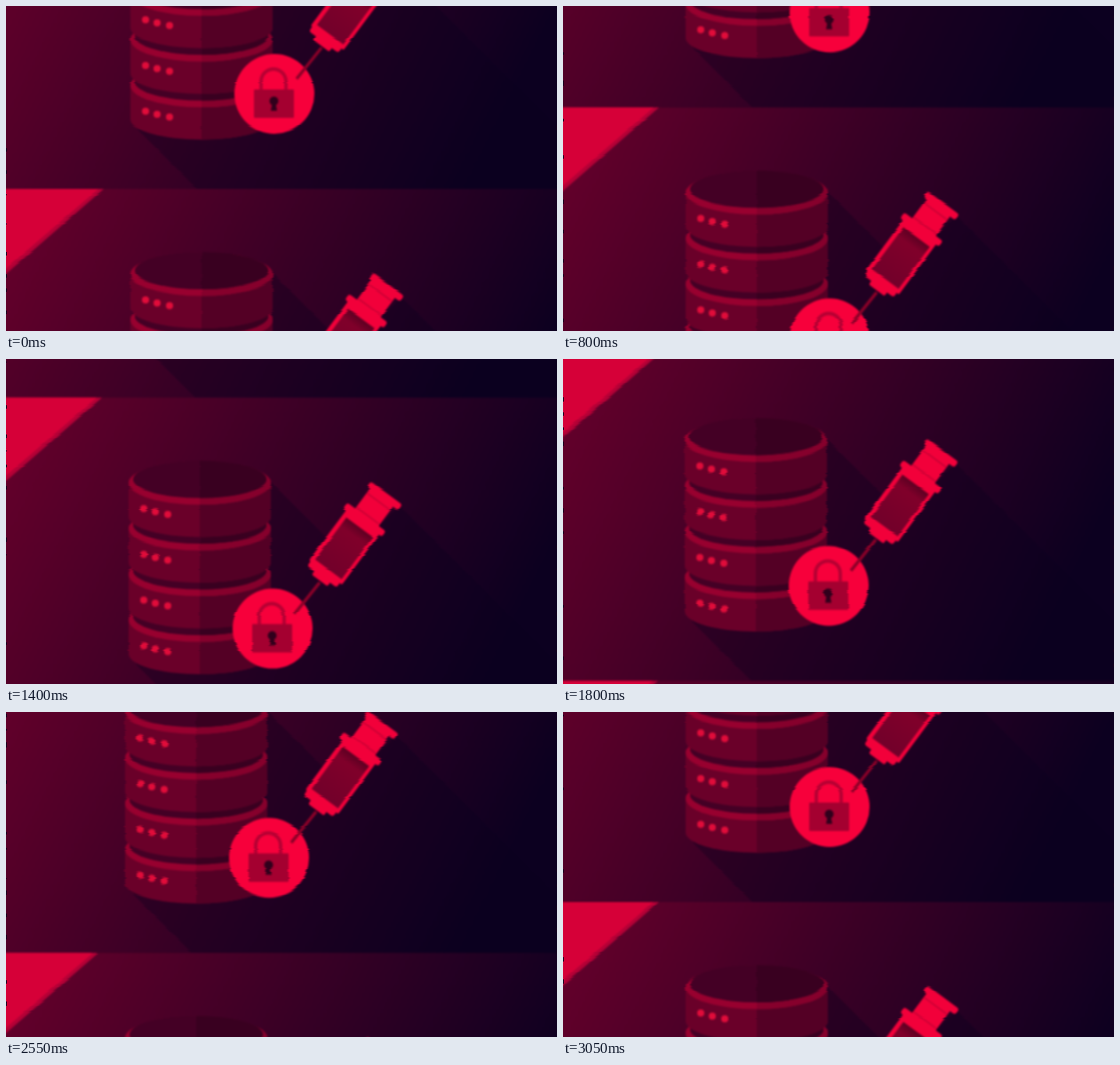
An HTML page that plays this animation: 620 by 366 pixels, repeating every 3.1 s.

```html
<!DOCTYPE html>
<html lang="en">
<head>
<meta charset="utf-8">
<title>Database injection</title>
<style>
  html, body { margin: 0; width: 100%; height: 100%; overflow: hidden; background: #14001c; }
  svg { display: block; }
</style>
</head>
<body>
<svg width="620" height="366" viewBox="0 0 620 366">
  <defs>
    <linearGradient id="night" gradientUnits="userSpaceOnUse" x1="0" y1="0" x2="560" y2="280">
      <stop offset="0" stop-color="#68002b"/>
      <stop offset="1" stop-color="#0c0020"/>
    </linearGradient>
    <linearGradient id="serum" x1="0" y1="0" x2="0" y2="1">
      <stop offset="0" stop-color="#5c0022"/>
      <stop offset=".2" stop-color="#80002a"/>
      <stop offset="1" stop-color="#72002a"/>
    </linearGradient>
    <filter id="tearing" filterUnits="userSpaceOnUse" x="0" y="0" width="620" height="366"
            color-interpolation-filters="sRGB">
      <feTurbulence id="noise" type="fractalNoise" baseFrequency="0.0001 0.12" numOctaves="1"/>
      <feColorMatrix values="1 0 0 0 0  0 0 0 0 .5  0 0 0 0 .5  0 0 0 0 1" result="rows"/>
      <feGaussianBlur in="SourceGraphic" stdDeviation=".8" result="soft"/>
      <feDisplacementMap in="soft" in2="rows" scale="4" xChannelSelector="R" yChannelSelector="G"/>
    </filter>

    <g id="disk">
      <path d="M138 92V134A80 23 0 0 0 298 134V92Z" fill="#6a0029"/>
      <path d="M218 92V157A80 23 0 0 0 298 134V92Z" fill="#540025"/>
      <ellipse cx="218" cy="96" rx="80" ry="24.5" fill="#98002f"/>
      <path d="M218 71.5A80 24.5 0 0 1 218 120.5Z" fill="#86002c"/>
      <ellipse cx="218" cy="92" rx="75" ry="21" fill="#440025"/>
      <path d="M218 71A75 21 0 0 1 218 113Z" fill="#390020"/>
      <g fill="#e00c3a">
        <circle cx="155" cy="125" r="4"/>
        <circle cx="168" cy="128.5" r="4"/>
        <circle cx="182" cy="131.5" r="4"/>
      </g>
    </g>

    <g id="syringe" transform="translate(427 109) rotate(36.5)" fill="#f2003a">
      <rect x="-22" y="-2" width="44" height="8" rx="3"/>
      <rect x="-18" y="4" width="33" height="34"/>
      <path d="M-17 11H14M-17 31H14" stroke="#c40034" stroke-width="1.5"/>
      <rect x="-29" y="33" width="54" height="8" rx="3"/>
      <rect x="-25" y="38" width="46" height="73" rx="2"/>
      <rect x="-23" y="109" width="41" height="8" rx="3"/>
      <rect x="-13" y="115" width="22" height="7" rx="2"/>
      <rect x="-20" y="47" width="37" height="59" fill="url(#serum)"/>
    </g>

    <g id="lock">
      <circle cx="300" cy="260" r="45" fill="#f7003b"/>
      <path d="M285 256V246A14 14 0 0 1 313 246V256" fill="none" stroke="#b60033" stroke-width="4"/>
      <rect x="277" y="255" width="45" height="32" rx="1" fill="#a40030"/>
      <circle cx="299.5" cy="268" r="5" fill="#30001c"/>
      <path d="M298 268H301L303 279H296Z" fill="#30001c"/>
    </g>

    <g id="panel">
      <rect x="-12" width="644" height="367.5" fill="url(#night)"/>
      <path d="M297 94L570 367H213L146 300ZM443 122L632 311V367H560L352 210Z" fill="#0a001e" fill-opacity=".34"/>
      <path d="M-12 0H108L0 94L-12 104Z" fill="#b40036"/>
      <path d="M-12 0H102L0 88L-12 98Z" fill="#d60038"/>
      <use href="#disk" y="154.5"/>
      <use href="#disk" y="103"/>
      <use href="#disk" y="51.5"/>
      <use href="#disk"/>
      <use href="#lock"/>
      <path d="M353 208L325 243" stroke="#8a0028" stroke-width="3.5"/>
      <use href="#syringe"/>
    </g>
  </defs>
  <g filter="url(#tearing)">
    <use class="reel" href="#panel"/>
    <use class="reel" href="#panel"/>
  </g>
</svg>
<script>
  const LOOP = 3100, STEP = 50, PERIOD = 367, START = 207;
  // Camera shake: [time, x, y]
  const shake = [
    [0, 2, -1], [350, -3, -.7], [800, 0, 2], [1400, 0, 2.3],
    [1800, -1, 1.5], [2550, -4, -.9], [3050, 0, 1.1], [3100, 2, -1]
  ];
  const panels = document.querySelectorAll('.reel');
  const noise = document.getElementById('noise');

  function shakeAt(t) {
    const i = shake.findIndex(key => key[0] > t);
    const [t0, x0, y0] = shake[i - 1], [t1, x1, y1] = shake[i];
    const k = (t - t0) / (t1 - t0);
    return [x0 + (x1 - x0) * k, y0 + (y1 - y0) * k];
  }

  function draw(time) {
    const t = Math.floor(time % LOOP / STEP) * STEP;
    const [dx, dy] = shakeAt(t);
    const travel = START - PERIOD * t / LOOP + dy;
    const seam = (travel + PERIOD) % PERIOD;
    panels.forEach((panel, i) =>
      panel.setAttribute('transform', `translate(${dx} ${seam - (1 - i) * PERIOD})`));
    noise.setAttribute('seed', t / STEP + 1);
  }

  const begin = performance.now();
  function tick() {
    draw(performance.now() - begin);
    requestAnimationFrame(tick);
  }
  tick();
</script>
</body>
</html>
```
